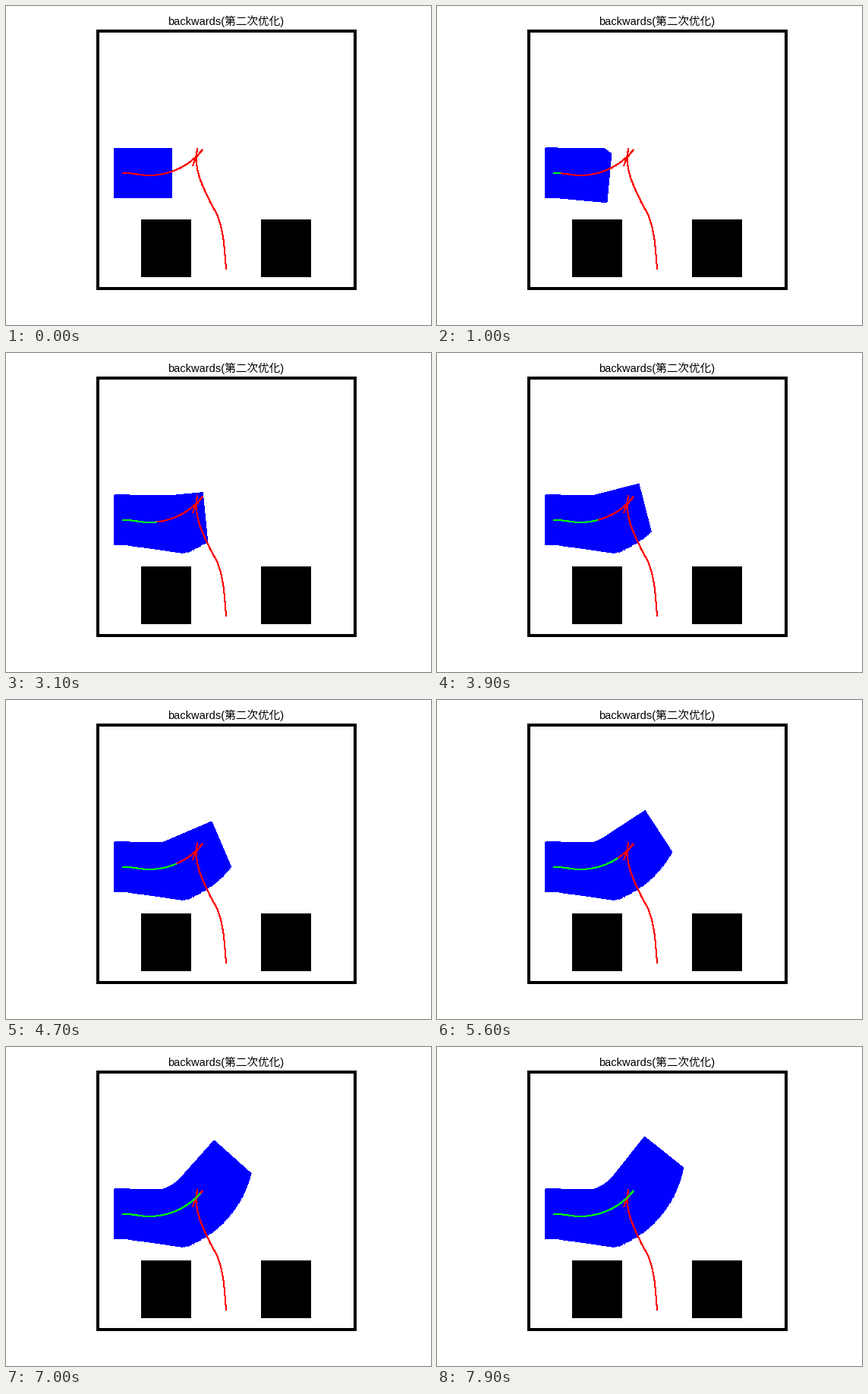
A matplotlib script that plays this animation: 560 px wide and 420 px high, repeating every 8000 ms.

```python
import numpy as np
import matplotlib.pyplot as plt
from matplotlib.animation import FuncAnimation
from matplotlib.collections import PolyCollection
from matplotlib.patches import Rectangle

W, H, DPI = 560, 420, 100
PX = 72 / DPI  # points per pixel
FRAMES, INTERVAL = 80, 100

# Vehicle, measured from the rear axle
REAR, FRONT, HALF = 11.8, 64.9, 32.7
START = (154.2, 219.8)
LENGTH = 115.0

# Drive time, start ramp and braking ramp in seconds
T_END, T_UP, T_DOWN = 7.9, 1.05, 1.25
SPEED = LENGTH / (T_END - T_UP / 2 - T_DOWN / 2)


def smooth(u):
    u = np.clip(u, 0, 1)
    return u * u * (3 - 2 * u)


def integrate(y, x, start=0.0):
    steps = (y[1:] + y[:-1]) / 2 * np.diff(x)
    return start + np.concatenate([[0], np.cumsum(steps)])


def spline(points, n=24):
    """Catmull-Rom curve through the points."""
    p = np.array(points, float)
    p = np.vstack([2 * p[0] - p[1], p, 2 * p[-1] - p[-2]])
    u = np.linspace(0, 1, n)[:, None]
    parts = []
    for a, b, c, d in zip(p, p[1:], p[2:], p[3:]):
        parts.append(0.5 * (2 * b + (c - a) * u
                            + (2 * a - 5 * b + 4 * c - d) * u**2
                            + (3 * b - a - 3 * c + d) * u**3))
    return np.vstack(parts)


# First leg: steer right, then swing over to a steady left turn
s = np.linspace(0, LENGTH, 1200)
bend = np.radians(np.interp(s, [0, 8, 27], [-0.65, -0.65, 0.645]))
theta = integrate(bend, s)
x = integrate(np.cos(theta), s, START[0])
y = integrate(-np.sin(theta), s, START[1])

# Distance driven at each frame
t = np.linspace(0, T_END, 1600)
speed = SPEED * smooth(t / T_UP) * smooth((T_END - t) / T_DOWN)
driven = np.interp(np.arange(FRAMES) * INTERVAL / 1000, t, integrate(speed, t))


def body(d):
    """Corners of the vehicle after distance d."""
    a = np.interp(d, s, theta)
    pos = np.array([np.interp(d, s, x), np.interp(d, s, y)])
    ahead = np.array([np.cos(a), -np.sin(a)])
    side = np.array([np.sin(a), np.cos(a)])
    return [pos + f * ahead + w * side
            for f, w in ((-REAR, -HALF), (FRONT, -HALF),
                         (FRONT, HALF), (-REAR, HALF))]


bodies = [body(d) for d in driven]

# Remaining legs: back, forward, then back into the gap
back = spline([(x[-1], y[-1]), (250.8, 199.5), (246, 210.5)])
forth = spline([(246, 210.5), (250, 199.5), (252.3, 187.5)])
park = spline([(252.3, 187.5), (250.6, 197.5), (251.6, 211.5), (256.5, 230),
               (268, 256), (279, 277), (285.3, 300), (288.2, 324),
               (290, 346)])
route = np.vstack([np.column_stack([x, y]), back, forth, park])

fig = plt.figure(figsize=(W / DPI, H / DPI), dpi=DPI, facecolor="white")
ax = fig.add_axes([0, 0, 1, 1])
ax.set_xlim(0, W)
ax.set_ylim(H, 0)
ax.axis("off")

ax.text(290, 25, "backwards(第二次优化)", ha="center", va="baseline",
        fontsize=14.67 * PX, color="black",
        fontfamily=["Liberation Sans", "Noto Sans CJK JP"])

for left in (178, 336):
    ax.add_patch(Rectangle((left, 281), 66, 76, fc="black", lw=0,
                           antialiased=False))

trail = PolyCollection([bodies[0]], facecolors="#0000ff", edgecolors="none",
                       antialiaseds=False, zorder=2)
ax.add_collection(trail, autolim=False)

ax.plot(*route.T, color="#ff0000", lw=PX, antialiased=False, zorder=3)
done, = ax.plot([], [], color="#00ff00", lw=PX, antialiased=False, zorder=4)

ax.add_patch(Rectangle((120.5, 33), 339, 339, fill=False, ec="black",
                       lw=4 * PX, joinstyle="miter", zorder=5))


def draw(i):
    trail.set_verts(bodies[:i + 1])
    n = np.searchsorted(s, driven[i]) if i else 0
    done.set_data(x[:n], y[:n])
    return trail, done


anim = FuncAnimation(fig, draw, frames=FRAMES, interval=INTERVAL,
                     repeat=True, repeat_delay=0, blit=False)
plt.show()
```
